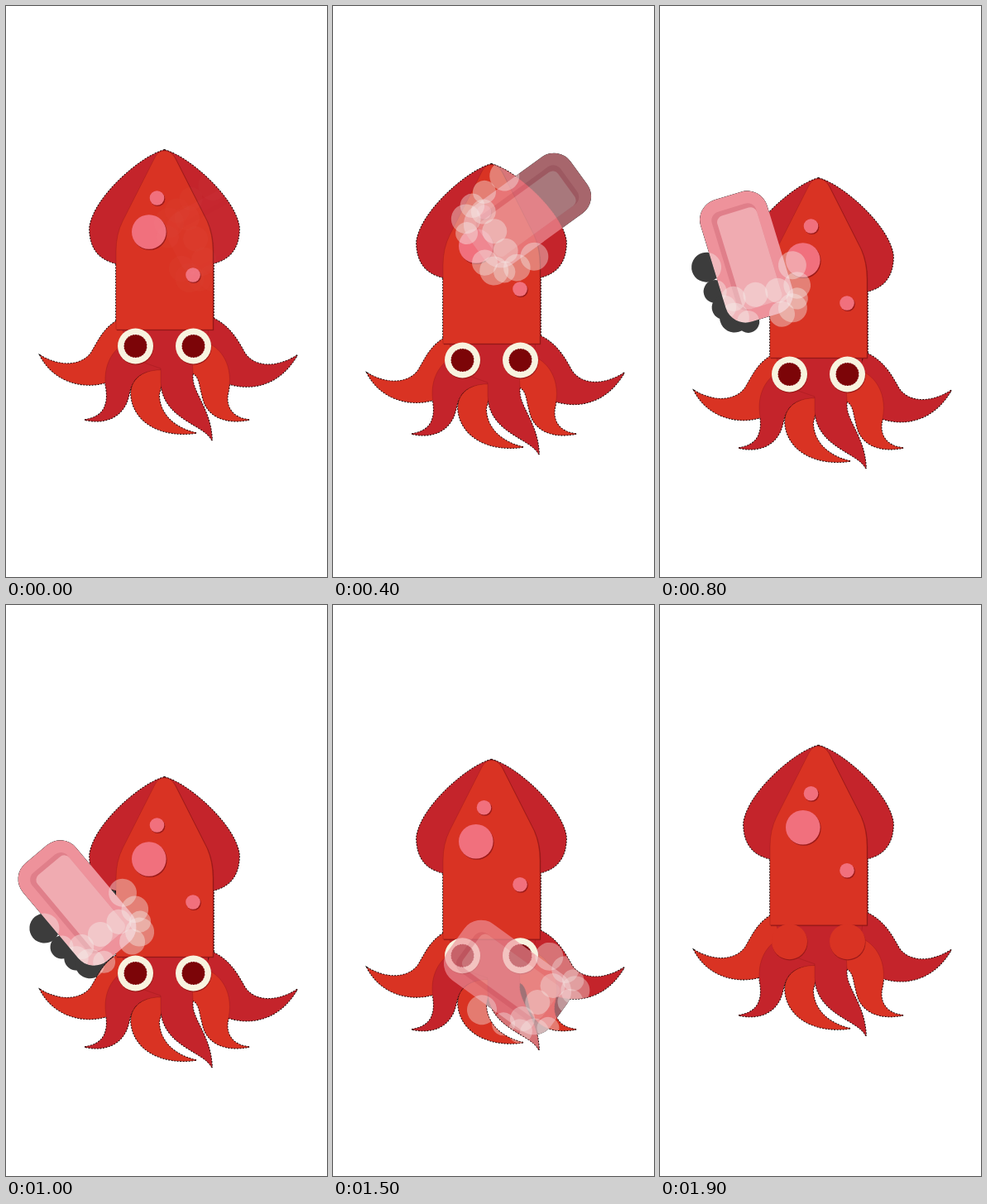
An HTML page that plays this animation: 388x690 px, repeating every 2 s.

```html
<!DOCTYPE html>
<html lang="en">
<head>
<meta charset="utf-8">
<title>Squid bath</title>
<style>
  html, body { margin: 0; width: 100%; height: 100%; overflow: hidden; background: #fff; }
  svg { display: block; width: 100%; height: 100%; }
  .dark { fill: #c4242b; }
  .light { fill: #d93323; }
  .spot { fill: #f1707d; }
  .shade { fill: #9c1a19; }
  .cream { fill: #f8f3df; }
  .pupil { fill: #7c0508; stroke: #fff; stroke-width: .8; stroke-dasharray: 1.2 2; }
  #cover { mask-type: alpha; }
</style>
</head>
<body>
<svg viewBox="0 0 388 690">
  <defs>
    <path id="body" d="M191.500 175Q184 175 180 183L141 260Q133 276 133 296V391H250V296Q250 276 243 260L204 183Q199 175 191.500 175Z"/>
    <path id="fin" d="M191.500 174C163 181 105 232 101 268C101 290 110 306 133 311L191.500 300Z"/>
    <g id="squid">
      <g id="arms">
        <path class="light" d="M41 422C66 437 91 435 103 419C113 402 119 387 140 377L160 440L121 455C90 464 56 452 41 422Z"/>
        <path class="dark" d="M352 422C327 438 301 437 289 420C279 402 270 386 248 376L230 430L270 457C305 467 335 452 352 422Z"/>
      </g>
      <path class="dark" d="M95 500C118 497 124 482 121 462C117 440 125 420 140 410H190V440C160 440 153 452 149 468C144 497 120 506 95 500Z"/>
      <path class="light" d="M230 516C207 511 186 496 185 470L192 440C165 438 150 452 151 470C154 505 190 522 230 516Z"/>
      <path class="light" d="M294 500C272 498 264 482 269 465C274 440 265 418 246 408L215 415L226 444C234 448 234 460 237 470C242 500 270 505 294 500Z"/>
      <path class="dark" d="M249 525C240 505 190 500 187 455V438L150 425L140 388H245L243 405L225 425L226 444C222 465 248 485 249 525Z"/>
      <g class="dark">
        <use href="#fin"/>
        <use href="#fin" transform="matrix(-1 0 0 1 383 0)"/>
      </g>
      <use href="#body" class="shade" x="1" y="1"/>
      <use href="#body" class="light"/>
    </g>
    <g id="dots">
      <circle cx="182.500" cy="232" r="8.800"/>
      <circle cx="172.800" cy="273" r="20.800"/>
      <circle cx="226" cy="325" r="8.800"/>
    </g>
    <circle id="eye" cx="156.500" cy="411" r="21.500"/>
    <circle id="iris" cx="156.500" cy="411" r="14"/>
    <g id="eyes"><use href="#eye"/><use href="#eye" x="70"/></g>
    <g id="face">
      <g class="shade"><use href="#dots" x="1" y="1.300"/><use href="#eyes" x=".5" y="1.200"/></g>
      <use href="#dots" class="spot"/>
      <use id="lids" href="#eyes"/>
      <g id="pupils" class="pupil"><use href="#iris"/><use href="#iris" x="70"/></g>
    </g>
    <rect id="bar" class="pose" x="-42" y="-77" width="84" height="154" rx="25"/>
    <g id="foam" class="pose"></g>
    <mask id="cover" maskUnits="userSpaceOnUse" x="0" y="0" width="388" height="690">
      <use href="#squid"/><use class="solid" href="#bar"/>
    </mask>
  </defs>
  <use class="solid" href="#bar"/>
  <use id="darkFoam" href="#foam" fill="#3c3c3c"/>
  <use href="#squid" stroke="#000" stroke-width="1.6" stroke-dasharray="2 1.500"/>
  <use href="#squid" stroke="#8a1414" stroke-opacity=".5" stroke-width=".6"/>
  <use href="#face"/>
  <g mask="url(#cover)">
    <g id="soap">
      <use href="#bar" fill="#ee929b"/>
      <g class="pose">
        <rect x="-28" y="-62" width="56" height="124" rx="11" fill="#e07f8a"/>
        <rect x="-22" y="-56" width="50" height="118" rx="8" fill="#f0abb1"/>
      </g>
    </g>
    <use id="lightFoam" href="#foam" fill="#f3ecea" fill-opacity=".42"/>
  </g>
</svg>
<script>
const LOOP = 2000, STEP = 100;
const $ = id => document.getElementById(id);
const clamp = v => Math.min(1, Math.max(0, v));
const show = (el, on) => { el.style.display = on ? '' : 'none'; };

// Soap path: time, x, y, angle
const KEYS = [
  [0, 272, 262, 62], [400, 235, 247, 54], [600, 160, 256, 16], [800, 104.5, 303, -17],
  [1000, 86, 360, -40], [1200, 138.5, 402, -52], [1500, 211, 450, -54], [1900, 290, 490, -56]
];

function bubble(cx, cy, r) {
  const c = document.createElementNS('http://www.w3.org/2000/svg', 'circle');
  Object.entries({ cx, cy, r }).forEach(([k, v]) => c.setAttribute(k, v));
  $('foam').append(c);
}

// Foam wraps the lower end of the soap, with a short row inside
for (let i = 0; i < 10; i++) {
  const u = i / 9, c = Math.cos(Math.PI * u), s = Math.sin(Math.PI * u);
  bubble(-50 * Math.sign(c) * Math.sqrt(Math.abs(c)),
    28 * u - 2 + 66 * Math.max(0, s) ** .8, 15.5 + 2.5 * Math.cos(2.2 * i));
}
for (let i = 0; i < 3; i++) bubble(27 * i - 30, 44 + 3 * i, 15);

const posed = document.querySelectorAll('.pose');
const solids = document.querySelectorAll('.solid');

function slope(i, k) {
  const a = KEYS[i - 1], b = KEYS[i + 1];
  return a && b ? (b[k] - a[k]) / (b[0] - a[0]) : 0;
}

// Cubic Hermite through the keys
function soapAt(t) {
  const i = Math.max(0, KEYS.findIndex(key => key[0] >= t) - 1);
  const a = KEYS[i], b = KEYS[i + 1], d = b[0] - a[0];
  const u = (t - a[0]) / d, v = 1 - u;
  return [1, 2, 3].map(k =>
    v * v * (1 + 2 * u) * a[k] + u * u * (3 - 2 * u) * b[k] +
    d * u * v * (v * slope(i, k) - u * slope(i + 1, k)));
}

function draw(ms) {
  const t = Math.floor((ms % LOOP) / STEP) * STEP;
  const dy = 38.25 - .0425 * Math.abs(t - 900);
  const move = `translate(0 ${dy})`;
  $('squid').setAttribute('transform', move);
  $('face').setAttribute('transform', move);
  $('arms').setAttribute('transform', `translate(0 ${dy * .25})`);

  const blink = t === 1900;
  $('lids').setAttribute('class', blink ? 'light' : 'cream');
  show($('pupils'), !blink);

  const [x, y, angle] = soapAt(t);
  const alpha = clamp(Math.min(t + 20, 1900 - t) / 600);
  posed.forEach(el => el.setAttribute('transform', `translate(${x} ${y}) rotate(${angle})`));
  $('soap').style.opacity = alpha;
  $('lightFoam').style.opacity = clamp(alpha * 1.4);
  // Faint parts are only seen on top of the squid
  solids.forEach(el => show(el, alpha > .2));
  show($('darkFoam'), alpha > .8);
}

const start = performance.now();
function tick() {
  draw(performance.now() - start);
  requestAnimationFrame(tick);
}
tick();
</script>
</body>
</html>
```
